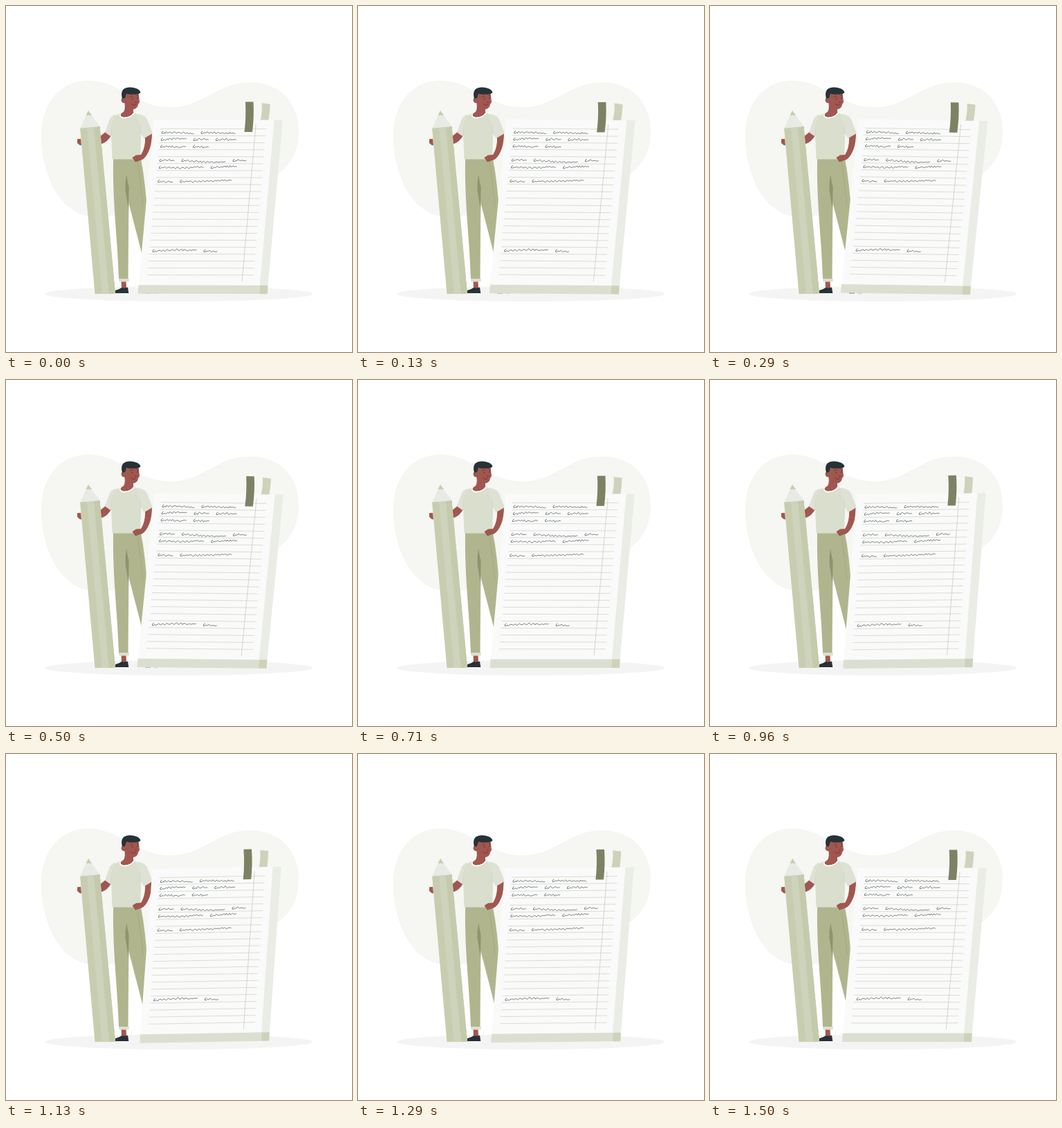
Recreate the animation shown at these times as an HTML page. Size 500 px wide and 500 px high, loop 1540 ms.

```html
<!DOCTYPE html>
<html lang="en">
<head>
<meta charset="utf-8">
<title>Notepad</title>
<style>
  html, body { margin: 0; width: 100%; height: 100%; overflow: hidden; background: #fff; }
  svg { display: block; width: 100%; height: 100%; }
  .skin { fill: #a0574f; }
  .ink { fill: #263238; }
  .line { fill: none; stroke: #263238; stroke-width: .6; stroke-linecap: round; stroke-linejoin: round; }
</style>
</head>
<body>
<svg viewBox="0 0 500 500">
  <path fill="#f6f7f3" stroke="#eef0e9" stroke-width=".6" d="M118 108.3C165 108 185 147 238 147C285 147 305 111 352 111C400 111 424 145 422 185C421 220 402 239 380 250L200 292C175 301 150 304 125 303.5C77 301 51.5 240 51.5 188C51.5 140 79 109 118 108.3Z"/>
  <ellipse cx="249.5" cy="416" rx="193.5" ry="11" fill="#f4f4f4"/>

  <g id="person">
    <path fill="#6d7478" d="M201 413H209V415.6H201ZM214 413H220V415.3H214Z"/>
    <path class="skin" d="M145 181L152 187Q147 196 139 199L134 199V190ZM166.5 397H173.5L174 408H167Z"/>
    <path class="ink" d="M158 411Q164 409.5 167 407Q171 408 176 406.5L177.3 415H158Z"/>
    <path fill="#b0b58d" d="M173 221H195Q202 258 204 300L210 400H206L196 357L177 283Z"/>
    <path fill="#b0b58d" d="M155 221H182L177.5 265L176.5 394H163C161 330 154 290 155 221Z"/>
    <path fill="#8e9470" d="M174 244Q172 255 172.5 266L177 294L177.6 262Z"/>
    <path fill="none" stroke="#9ea479" stroke-width=".7" d="M190 223Q195 260 198 290"/>
    <path fill="#dcdfd2" d="M162.5 394H178L177.5 398.5H163.5Z"/>
    <path fill="#dadecd" d="M164 156L186 155Q194 157 196 165L194 221.5H153.5L152 185L154 159Z"/>
    <path class="skin" d="M201 188L211 183Q211 198 207 208Q203 218 197 222L187 225.5L182.5 219L188 215.5L195 215Q202 204 201 188Z"/>
    <path fill="#dee1d4" d="M157 157Q151 159 148.5 167L143 182.5L151.5 188.5L154 180ZM188 156Q200 156 204 164L212 184L200 191L194 181Z"/>
    <path fill="none" stroke="#c5cab4" stroke-width=".5" d="M154 166L151.5 188M193 170L194 181L200 191"/>
    <path class="skin" d="M171 138L184 147V153Q185 157 182 159Q174 164 166 159Q165 155 170 153Q173 148 171 138Z"/>
    <path fill="none" stroke="#fff" stroke-width="1.8" d="M164.5 157Q165 162 172 161.5Q181 161 184.5 155"/>
    <path class="skin" d="M172 125H191.5L193 139L191 142Q190 149 183 149.5Q174 149 172 140Q167 141 166.5 136Q167 132 171 133Z"/>
    <path class="ink" d="M168 134C165.5 124 168 118 178 117.5C187 117 194 121 194.5 125Q191 128.5 184 127.5Q178 128.5 174 126.5L172 133Z"/>
    <path class="line" d="M180 131L183 130M189 129.5L191 130"/>
    <circle class="ink" cx="182.5" cy="134" r=".8"/>
    <circle class="ink" cx="190" cy="133" r=".7"/>
    <circle cx="187.5" cy="139" r="1.4" fill="#a23b38"/>
    <path fill="none" stroke="#6e312e" stroke-width=".7" d="M180 141Q184 145 188 142"/>
  </g>

  <g id="pencil">
    <path fill="#c8cdb0" d="M107 176.5L135.5 174L158 415.5L128.5 416Z"/>
    <path fill="#ced3bb" d="M117 175.5L127 174.7L149 416H139Z"/>
    <path fill="#c4caac" d="M127 174.7L135.5 174L158 415.5L149 416Z"/>
    <path fill="#e8eae4" d="M107 176.5L119 151L135.5 174Z"/>
    <path fill="#c8cdb0" d="M119 151L115.6 158L124 158Z"/>
    <path class="skin" d="M103 192.3L108 192L109 201.5L106.5 201L103 198Z"/>
  </g>

  <g id="pad">
    <path fill="#cdd2ba" d="M369.5 140L381.5 141.5Q381 154 379 167H367Q370.5 152 369.5 140Z"/>
    <path fill="#eaece6" d="M387 164.5H399.7L378.7 404H366Z"/>
    <path fill="#fafafa" d="M213.4 164.5H387.5L367 404H191.8Z"/>
    <path fill="#dbdfd0" d="M191.8 403.5H367.3L366.3 416H191Z"/>
    <path fill="#cdd2ba" d="M367.3 403.5H378.8L378 416H366.3Z"/>
    <path id="rules" fill="none" stroke="#d3d7c4" stroke-width=".8"/>
    <path fill="none" stroke="#c4c7bc" stroke-width=".7" d="M361 170.5L341.3 398"/>
    <path id="writing" class="line"/>
    <path fill="#7c8264" d="M345.7 138.5H357.3Q358.5 160 355.8 182H344.3Q347 160 345.7 138.5Z"/>
  </g>
</svg>
<script>
  const $ = id => document.getElementById(id);
  const PERIOD = 1540, LEAD = 38, ROW = 10.06, GAP = 11;

  let seed = 7;
  const random = () => (seed = seed * 16807 % 2147483647) / 2147483647;

  // One word: an opening loop, then loose waves that flatten towards the end
  function scribble(x, y, length) {
    let d = `M${x + 2} ${y - 2}Q${x - 1} ${y - 1} ${x} ${y + 1.5}Q${x + 2} ${y + 2} ${x + 4} ${y}`;
    let side = 1;
    for (let s = 4; s < length;) {
      const step = Math.min(1.5 + 2.5 * random(), length - s);
      const swing = side * (.6 + 2.4 * random()) * (s > length - 8 ? .4 : 1);
      d += `q${step / 2} ${swing} ${step} ${random() - .5}`;
      s += step;
      side = -side;
    }
    return d;
  }

  // Word lengths on each written row
  const text = {
    0: [46, 49], 1: [36, 21, 29], 2: [36, 22], 4: [21, 63, 19],
    5: [64, 37], 7: [21, 74], 17: [63, 19]
  };
  let rules = '', writing = '';
  for (let row = 0; row < 22; row++) {
    rules += `M${223 - row * .9} ${177.5 + row * ROW}H${376 - row * .86}`;
    let x = 225 - row * .75;
    for (const length of text[row] || []) {
      writing += scribble(x, 183 + row * ROW, length);
      x += length + GAP;
    }
  }
  $('rules').setAttribute('d', rules);
  $('writing').setAttribute('d', writing);

  // Linear sway: 0, 1, -1, 0 degrees at 0, 25, 75 and 100 %
  function sway(p) {
    if (p < .25) return p * 4;
    return p < .75 ? 2 - p * 4 : p * 4 - 4;
  }

  function draw() {
    const p = ((performance.now() + LEAD) % PERIOD) / PERIOD;
    $('pad').setAttribute('transform', `rotate(${sway(p)} 295.5 277)`);
    requestAnimationFrame(draw);
  }
  draw();
</script>
</body>
</html>
```
